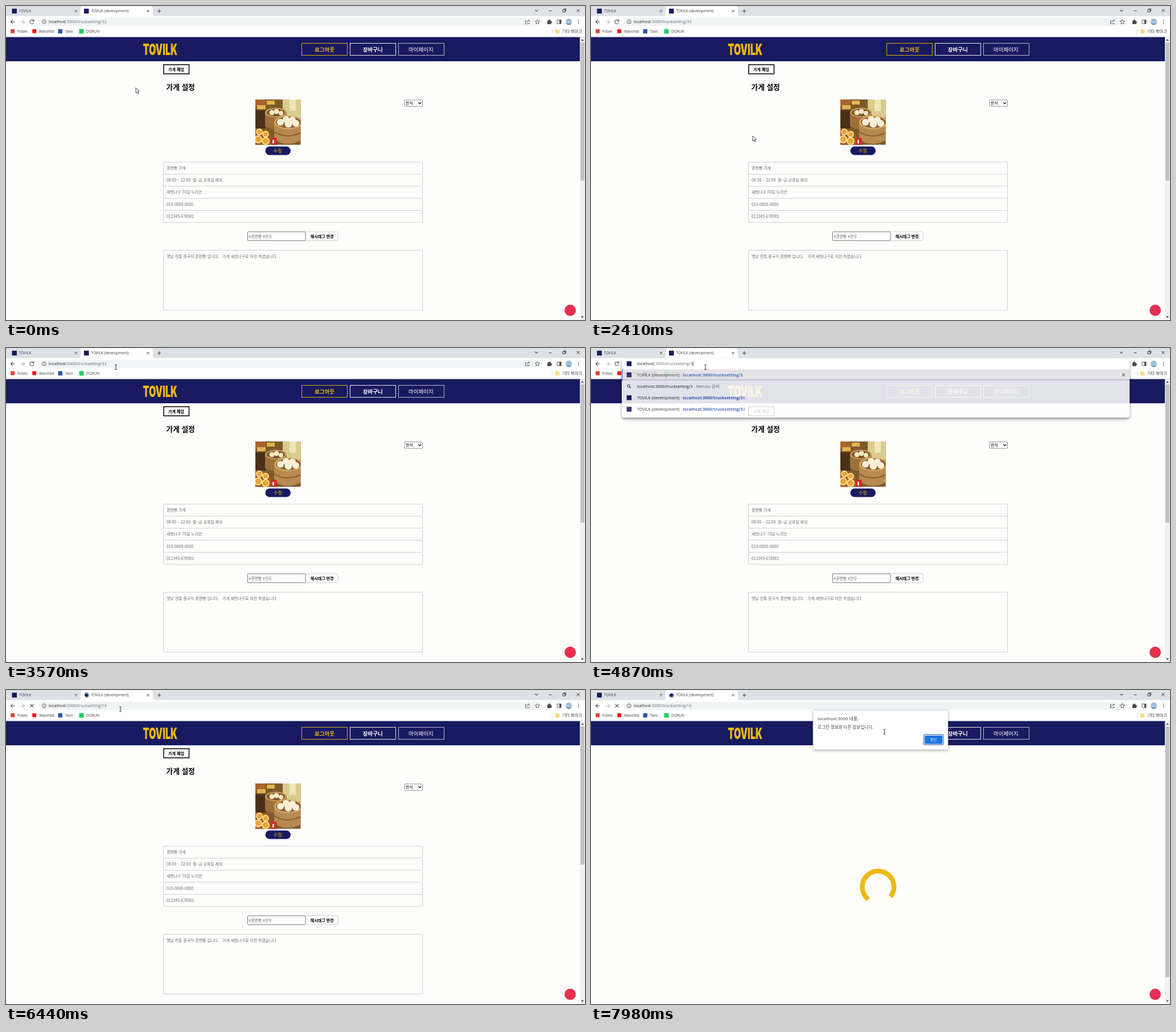
Animation of 1017 by 551 pixels, one loop 8 s. Source, as an HTML page:

```html
<!DOCTYPE html>
<html lang="ko">
<head>
<meta charset="utf-8">
<title>Store settings</title>
<style>
html, body { margin: 0; width: 100%; height: 100%; overflow: hidden; background: #fdfdfc; }
svg { display: block; width: 100vw; height: 100vh; }
text { font-family: "Noto Sans CJK KR", "Noto Sans CJK", "Noto Sans", sans-serif; font-size: 7.06px; white-space: pre; }
.ui text { font-family: "Open Sans", "Noto Sans CJK KR", "Noto Sans CJK", sans-serif; font-size: 6.4px; fill: #3c4043; }
.ui .url { font-size: 7.2px; fill: #202124; }
.ui .dim { fill: #6b6f74; }
.ui .hit { fill: #3a5cb8; }
.ui .ok { fill: #fff; }
.b { font-weight: 700; }
.h { font-size: 12.7px; font-weight: 700; }
.nav { font-size: 9.53px; fill: #fff; }
.f, .f text { font-size: 6.92px; fill: #6a6a6a; }
.box { fill: none; stroke: #c9cacb; stroke-width: .9; }
.ico { fill: none; stroke: #45484c; stroke-width: 1.05; }
#logo { font: 900 16px Inter, sans-serif; fill: #f0b90f; }
</style>
</head>
<body>
<svg viewBox="0 0 1017 551" preserveAspectRatio="none">
<defs>
  <filter id="soft" x="-30%" y="-50%" width="160%" height="220%"><feDropShadow dx="0" dy="1.5" stdDeviation="2.5" flood-color="#000" flood-opacity=".3"/></filter>
  <filter id="deep" x="-2%" y="-10%" width="104%" height="140%"><feDropShadow dx="0" dy="3" stdDeviation="2.5" flood-color="#000" flood-opacity=".45"/></filter>
  <linearGradient id="sky" x2="0" y2="1"><stop stop-color="#8fb4d6"/><stop offset=".6" stop-color="#a9cbe2"/><stop offset="1" stop-color="#4f7fa5"/></linearGradient>
  <clipPath id="photoClip"><path d="M438 164h79.5v79.5H438z"/></clipPath>
</defs>
<rect width="1017" height="551" fill="#fdfdfc"/>

<g id="page">
  <g id="shop">
    <rect x="277" y="103" width="44.5" height="16" fill="#fdfdfc" stroke="#111" stroke-width="1.6"/>
    <text x="285" y="113.6" class="b">가게 폐업</text>
    <text x="281.5" y="147.2" class="h">가게 설정</text>

    <g clip-path="url(#photoClip)">
      <path fill="#7d5a2c" d="M438 164h80v80h-80z"/>
      <path fill="#d9cc8c" d="M486 164h32v32h-24l-8-14z"/>
      <path fill="#f0e6b8" d="M498 164h11v20h-11z"/>
      <path fill="#a8642c" d="M438 164h18v12h-18z"/>
      <path fill="#e0b450" d="M441 174h15v7h-15zM458 166h14v7h-14z"/>
      <path fill="#4a3018" d="M438 183h18v32h-18z"/>
      <path fill="#9c7038" d="M455 187v24q20 10 38 0v-24z"/>
      <ellipse cx="474" cy="187" rx="19" ry="8.5" fill="#c69a5c"/>
      <ellipse cx="474" cy="187" rx="16" ry="6.5" fill="#7a5428"/>
      <g fill="#f8e8c4"><circle cx="467" cy="187" r="4.5"/><circle cx="475" cy="185" r="4.5"/><circle cx="483" cy="188" r="4"/></g>
      <path fill="#b88a50" d="M471 205v29q24 16 49 0v-29z"/>
      <path fill="none" stroke="#805a2c" stroke-width="2" d="M471 221q24 14 49 0"/>
      <ellipse cx="496" cy="204" rx="25" ry="12" fill="#d6ac6c"/>
      <ellipse cx="496" cy="204" rx="22" ry="10" fill="#8a6030"/>
      <g fill="#fbf0d6"><circle cx="482" cy="204" r="6"/><circle cx="492" cy="199" r="6"/><circle cx="503" cy="200" r="6"/><circle cx="496" cy="207" r="6.5"/><circle cx="509" cy="206" r="6"/></g>
      <path fill="#a05c18" d="M438 214l20 4 17 26h-37z"/>
      <g fill="#eba434" stroke="#fbe2a4" stroke-width="1.8"><circle cx="445" cy="221" r="5"/><circle cx="456" cy="225" r="5"/><circle cx="443" cy="234" r="6"/><circle cx="456" cy="237" r="6"/></g>
      <path fill="#c9302c" d="M466 231h9l2 13h-12z"/>
      <path fill="#f1dfd2" d="M468 235h3v6h-3z"/>
    </g>
    <rect x="455.5" y="246.5" width="44.5" height="15" rx="7.5" fill="#181a60"/>
    <text x="470" y="257" style="font-size:8px" fill="#f0b90f">수정</text>

    <rect x="700" y="164.8" width="31.5" height="11.4" rx="1.2" fill="#fff" stroke="#777" stroke-width=".8"/>
    <text x="702" y="173.1">한식</text>
    <path d="M724.3 169l2.5 2.6 2.5-2.6" fill="none" stroke="#111" stroke-width="1.2"/>

    <path class="box" d="M276.7 274H731.7V379.7H276.7zM276.7 295.1H731.7M276.7 316.2H731.7M276.7 337.3H731.7M276.7 358.5H731.7"/>
    <g class="f">
      <text x="282" y="287">콩찐빵 가게</text>
      <text x="282" y="308.2">08:00 ~ 22:00  월~금 공휴일 제외</text>
      <text x="282" y="329.3">새벗나구 70길 누리안</text>
      <text x="282" y="350.5">010-0000-0000</text>
      <text x="282" y="371.6">012345-678901</text>
    </g>

    <rect x="424.4" y="396.2" width="101.6" height="15.6" rx="1" fill="#fff" stroke="#767676"/>
    <text x="426.3" y="406.7" class="f">#콩찐빵 #만두</text>
    <path class="box" d="M526.5 396H580q3.3 0 3.3 3.3v9.2q0 3.3-3.3 3.3H526.5"/>
    <text x="534.7" y="406.7" class="b">해시태그 변경</text>

    <rect x="276.7" y="428.7" width="455" height="105" class="box"/>
    <text x="282" y="441.8" class="f">옛날 전통 중국식 콩찐빵 입니다.   가게 새벗나구로 이전 하였습니다</text>

    <rect x="446" y="604" width="52" height="25.5" rx="12.7" fill="#fff" filter="url(#soft)"/>
    <circle cx="459.5" cy="616.8" r="11.2" fill="#dc2743"/>
    <text x="525.5" y="624.6" class="f" style="font-size:18.6px">영업중</text>

    <text x="281.5" y="710.7" class="h">가게 메뉴 추가</text>
    <rect x="277" y="728.5" width="52.5" height="53" class="box"/>
    <path d="M278.5 730.5h5l3 3v6h-8z" fill="#d6e4f3" stroke="#8a949e" stroke-width=".7"/>
    <path d="M279 739l3-4 4 4z" fill="#55a04c"/>
    <text x="288" y="737.4" style="font-size:8.1px">새로운 메뉴</text>
    <text x="278" y="746.2" style="font-size:8.1px">이미지</text>
    <path class="box" d="M335 782V729.8H663.5V782M335 751.2H663.5"/>
    <text x="340" y="743.2" class="f">메뉴 이름</text>
    <text x="340" y="764.4" class="f">메뉴 소개</text>
    <rect x="669.7" y="751" width="45.5" height="24" fill="#fdfdfc" stroke="#111" stroke-width="1.6"/>
    <text x="686" y="764.4" class="b">추가</text>
  </g>
  <g id="loader">
    <circle id="ring" cx="504.3" cy="345.5" r="27.8" fill="none" stroke="#ecb912" stroke-width="8.4" pathLength="100" stroke-dasharray="75 25"/>
  </g>
  <rect y="54" width="1008" height="43" fill="#181a60"/>
  <text id="logo" transform="translate(240.5 86) scale(1 1.72)">TOVILK</text>
  <g fill="none" stroke="#e8e8ee">
    <rect x="519.5" y="65.5" width="80" height="21" stroke="#d9a91d"/>
    <rect x="604.5" y="65.5" width="80" height="21"/>
    <rect x="689.5" y="65.5" width="80" height="21" stroke="#b9bacb"/>
  </g>
  <text x="542" y="79.5" class="nav b" style="fill:#f0b90f">로그아웃</text>
  <text x="626.8" y="79.5" class="nav b">장바구니</text>
  <text x="707" y="79.5" class="nav">마이페이지</text>
</g>

<circle cx="991" cy="534" r="10" fill="#e5304f"/>
<rect x="1008" y="54" width="9" height="497" fill="#f1f1f1"/>
<rect id="thumb" x="1009" width="7" fill="#c1c1c1"/>
<path d="M1010 61l2.5-3 2.5 3zM1010 544.5l2.5 3 2.5-3z" fill="#505050"/>

<g class="ui">
  <rect width="1017" height="18.5" fill="#dee1e6"/>
  <rect y="17.7" width="1017" height="36.5" fill="#fff"/>
  <path d="M0 54.2H1017" stroke="#dcdee1" stroke-width=".7"/>
  <path d="M127 18q4 0 4-4V5q0-4.5 4.5-4.5H253.5Q258 .5 258 5v9q0 4 4 4z" fill="#fff"/>
  <rect x="10.5" y="4.7" width="8.5" height="8.5" fill="#181a60"/>
  <text x="23" y="11.3">TOVILK</text>
  <text x="149.5" y="11.3">TOVILK (development)</text>
  <rect id="tabIcon" x="137" y="4.7" width="8.5" height="8.5" fill="#181a60"/>
  <g id="tabBusy">
    <circle cx="141.3" cy="9" r="3.1" fill="#181a60"/>
    <circle id="tabArc" cx="141.3" cy="9" r="4.2" fill="none" stroke="#3f6fc4" pathLength="100" stroke-dasharray="65 35"/>
  </g>
  <g class="ico">
    <path d="M121 7l4 4m0-4l-4 4M247.5 7l4 4m0-4l-4 4M266 9h6.5M269.2 5.7v6.6"/>
    <path d="M929 6.5l2.7 2.7 2.7-2.7M953.5 8.5h5M978 6.5h4v4h-4zM979.5 6.5V5h4v4h-1.5M1002.5 5.5l5 5m0-5l-5 5"/>
    <path d="M15.5 27.7H8.5M11.8 24.3l-3.4 3.4 3.4 3.4"/>
    <path d="M25.5 27.7h7M29.2 24.3l3.4 3.4-3.4 3.4" stroke="#b5b8bb"/>
    <path id="reload" d="M48.2 25.5a3.5 3.5 0 1 0 .7 3M48.9 23.7v2.6h-2.7"/>
    <path id="stop" d="M42.5 24.7l6 6m0-6l-6 6"/>
  </g>
  <rect id="pill" x="57" y="20.7" width="885" height="14" rx="7"/>
  <g class="ico" style="stroke-width:.8">
    <circle cx="67" cy="27.7" r="3.4"/><path d="M67 27v2.6M67 25.3v1"/>
    <path d="M914.5 25.5h-2v5.5h6.5v-2M914.5 29q.5-3.5 4.5-3.5M917.5 23.7l2 1.8-2 1.8"/>
    <path d="M933.4 23.7l1.2 2.6 2.8.3-2.1 1.9.6 2.8-2.5-1.4-2.5 1.4.6-2.8-2.1-1.9 2.8-.3z"/>
    <rect x="968" y="24.5" width="7" height="6.5"/>
  </g>
  <path d="M972 24.5h3V31h-3zM951 25.5h2q0-2 1.3-2t1.3 2h2v2q1.5 0 1.5 1.3t-1.5 1.3v1.7h-6.6z" fill="#45484c"/>
  <circle cx="988.5" cy="27.7" r="5.7" fill="url(#sky)"/>
  <g fill="#45484c"><circle cx="1005.5" cy="24.9" r=".8"/><circle cx="1005.5" cy="27.7" r=".8"/><circle cx="1005.5" cy="30.5" r=".8"/></g>
  <text id="url" class="url" x="75" y="30.2"></text>

  <rect x="8.2" y="40.7" width="7" height="7" fill="#dd4337"/><text x="20" y="46.6">Fobex</text>
  <rect x="46.2" y="40.7" width="7" height="7" fill="#f01c1c"/><text x="58" y="46.6">WavoNid</text>
  <rect x="91.5" y="40.7" width="7.5" height="7.5" fill="#2459b0"/><text x="104" y="46.6">Tavo</text>
  <rect x="128.5" y="40.5" width="8" height="8" fill="#1fd065"/><text x="141" y="46.6">DORUN</text>
  <path d="M959.5 40v9" stroke="#d4d6d9"/>
  <path d="M965 40.7h3l1 1h3.3v6.5H965z" fill="#f5dc7c"/>
  <text x="977" y="46.6" style="font-size:7.2px">기타 북마크</text>

  <g id="drop">
    <rect id="dropBox" x="54" y="18" width="892" rx="5" fill="#fff" filter="url(#deep)"/>
    <rect x="54" y="37.2" width="892" height="20" fill="#dfe0e3"/>
    <rect x="54" y="37.2" width="1.6" height="20" fill="#3f6fc4"/>
    <path d="M932.8 44.7l5 5m0-5l-5 5" class="ico"/>
    <g id="rows"></g>
  </g>
  <g id="typed">
    <rect x="54" y="18" width="892" height="19.2" rx="3" fill="#fff"/>
    <rect x="62.7" y="23.3" width="8.5" height="8.5" fill="#181a60"/>
    <text id="typedUrl" class="url" x="81" y="30.2"></text>
  </g>
  <path id="caret" stroke="#222" stroke-width=".8"/>

  <g id="alert">
    <rect x="390" y="35.7" width="237" height="68.8" rx="2" fill="#fff" stroke="#c5c7ca" stroke-width=".5" filter="url(#soft)"/>
    <text x="398.3" y="52.6" style="font-size:7.9px">localhost:3000 내용:</text>
    <text x="398.3" y="67.7" style="font-size:7.5px">로그인 정보와 다른 정보입니다.</text>
    <rect x="584.3" y="78.2" width="34.8" height="18" rx="3" fill="#fff" stroke="#3f6fae" stroke-width="1.2"/>
    <rect x="586" y="79.9" width="31.4" height="14.6" rx="1.8" fill="#1a73e0"/>
    <text x="595.5" y="89.5" class="ok">확인</text>
  </g>
</g>

<path id="arrow" d="M0 0V8.8L2 7 3.4 10.3 5 9.6 3.6 6.4H6.2z" fill="#fff" stroke="#222" stroke-width=".8"/>
<path id="beam" d="M-2-4.2h1.5l.5.5.5-.5H2M0-3.8V3.8M-2 4.2h1.5l.5-.5.5.5H2" fill="none" stroke="#222" stroke-width=".9"/>
</svg>

<script>
const LOOP = 8000, OPEN = 4740, ENTER = 5720, LOAD = 6510, ALERT = 7150;
const PATH = 'localhost:3000/trucksetting/';
const $ = id => document.getElementById(id);
const show = (id, on) => { $(id).style.display = on ? '' : 'none'; };
const clamp = v => Math.min(1, Math.max(0, v));
const ease = (t, a, b) => { const p = clamp((t - a) / (b - a)); return p * p * (3 - 2 * p); };
const latest = (list, t) => list.filter(k => k[0] <= t).pop();

// Rests above the fields while scrolling; still heading for the button when the loop ends
const mouse = [[0, 228, 143.5], [340, 228, 143.5], [1250, 340, 362], [1700, 340, 362], [2300, 284, 228],
  [3200, 284, 228], [3520, 193, 33.5], [3900, 193, 33.5], [4200, 201, 33.5], [7560, 201, 33.5], [8160, 601, 84]];
const shapes = [[0, 'arrow'], [930, 'beam'], [2080, 'arrow'], [3480, 'beam'], [7650, 'arrow'], [7890, 'beam']];
const typing = [[0, '32'], [OPEN, '3'], [5000, ''], [5250, '1'], [5450, '16']];
const hints = { '32': [], '3': ['30', '32'], '': ['30', '32'], '1': ['16'], '16': [] };

const address = tail => `localhost<tspan class="dim">${PATH.slice(9)}${tail}</tspan>`;

function pageRow(y, typed, full) {
  const rest = full.slice(typed.length);
  return `<rect x="62.7" y="${y - 4.3}" width="8.5" height="8.5" fill="#181a60"/>
    <text class="url" x="81" y="${y + 2.5}">TOVILK (development)<tspan class="dim"> - </tspan><tspan class="hit b">${PATH}${typed}</tspan><tspan class="hit">${rest}</tspan></text>`;
}

function suggestions(typed) {
  const search = `<path class="ico" d="M68 68.7l2 2M68.4 66.7a2.2 2.2 0 1 1-4.4 0a2.2 2.2 0 1 1 4.4 0"/>
    <text class="url" x="81" y="69.7">${PATH}${typed}<tspan class="dim"> - Wendlo 검색</tspan></text>`;
  return pageRow(47.2, typed, typed) + search +
    hints[typed].map((s, i) => pageRow(87.3 + i * 20.2, typed, s)).join('');
}

let lastTail = null;
function setTail(tail) {
  if (tail === lastTail) return;
  lastTail = tail;
  $('url').innerHTML = $('typedUrl').innerHTML = address(tail);
  $('rows').innerHTML = suggestions(tail);
  $('dropBox').setAttribute('height', 63.5 + hints[tail].length * 20.2);
}

function drawMouse(t) {
  const i = mouse.findIndex(k => k[0] > t);
  const [t0, x0, y0] = mouse[i - 1], [t1, x1, y1] = mouse[i];
  const p = ease(t, t0, t1), kind = latest(shapes, t)[1];
  show('arrow', kind === 'arrow');
  show('beam', kind === 'beam');
  $(kind).setAttribute('transform', `translate(${x0 + (x1 - x0) * p} ${y0 + (y1 - y0) * p})`);
}

function draw(t) {
  const focus = t >= 4200 && t < ENTER, open = t >= OPEN && t < ENTER;
  const busy = t >= ENTER, loading = t >= LOAD;

  const scroll = 212 * (ease(t, 2420, 2800) - ease(t, 2880, 3220));
  $('page').setAttribute('transform', `translate(0 ${-scroll})`);
  $('thumb').setAttribute('y', 64 + scroll * .49);
  $('thumb').setAttribute('height', loading ? 440 : 242.5);
  show('shop', !loading);
  show('loader', loading);
  $('ring').setAttribute('transform', `rotate(${135 + (t - LOAD) * .24} 504.3 345.5)`);

  setTail(latest(typing, t)[1]);
  show('url', !open);
  show('typed', open);
  show('drop', open);
  $('drop').style.opacity = clamp((t - OPEN) / 150);
  const pill = $('pill');
  pill.setAttribute('fill', focus ? '#fff' : '#f1f3f4');
  pill.setAttribute('stroke', focus && !open ? '#1a73e8' : 'none');
  show('caret', focus);
  if (focus) {
    const label = $(open ? 'typedUrl' : 'url');
    const x = (open ? 81 : 75) + label.getComputedTextLength() + .5;
    $('caret').setAttribute('d', `M${x} 23.2v8.6`);
  }

  show('reload', !busy);
  show('stop', busy);
  show('tabIcon', !busy);
  show('tabBusy', busy);
  $('tabArc').setAttribute('transform', `rotate(${(t - ENTER) * .3} 141.3 9)`);
  show('alert', t >= ALERT);
  drawMouse(t);
}

const start = performance.now();
function tick() {
  draw((performance.now() - start) % LOOP);
  requestAnimationFrame(tick);
}
tick();
</script>
</body>
</html>
```
